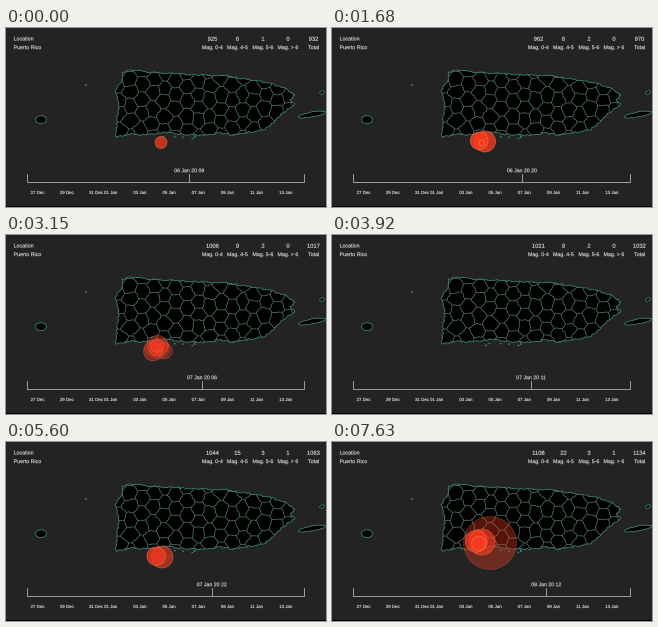
Write a matplotlib script that moves like this. It is 320 px wide and 179 px high and loops after 7.7 s.

```python
import numpy as np
import matplotlib.pyplot as plt
from matplotlib.animation import FuncAnimation
from matplotlib.collections import LineCollection
from matplotlib.patches import Circle, PathPatch, Polygon, Rectangle
from matplotlib.path import Path
from matplotlib.textpath import TextPath
from matplotlib.tri import Triangulation

W, H, DPI = 320, 179, 100
FRAMES, INTERVAL = 110, 70
BG, INK, AXIS = "#232323", "#dedede", "#b8b8b8"
COAST, BORDER = "#3c887c", "#55776e"
FILL, RIM = "#f83a1e", "#ff7a58"

plt.rcParams.update({"font.family": "Liberation Sans", "toolbar": "None"})
rng = np.random.default_rng(7)

# Corners of the main island, clockwise from the north-west
ISLAND = [(116, 44), (125, 42), (154, 45), (194, 47), (222, 48), (240, 51),
          (262, 55), (279, 60), (289, 67), (284, 72), (289, 76), (277, 85),
          (268, 94), (258, 102), (244, 104), (228, 107), (212, 105), (196, 107),
          (178, 107), (162, 104), (140, 107), (125, 106), (110, 109), (111, 97),
          (113, 76), (109, 63), (116, 52)]

# Small islands: x, y, half width, half height, tilt
ISLES = [(35, 91.7, 5.5, 4, 0), (306, 86.5, 14, 2.4, -0.18),
         (316, 64.5, 2.4, 1.6, -0.4), (80, 57, 0.7, 0.5, 0)]

# Quake swarms: first and last frame, count, x, y, radius
SWARMS = [(-2, 7, 1, 155, 114.5, 6.2), (18, 54, 8, 153, 113.5, 10.5),
          (58, 71, 4, 153, 113, 8), (73, 92, 3, 156, 115, 11),
          (80, 126, 1, 158, 101, 26.5), (94, 104, 1, 151, 99, 4.5),
          (100, 128, 5, 150, 100, 13)]

# Running totals at a few hours
HOURS = [0, 11, 21, 26, 37, 44, 51]
SMALL = [925, 962, 1006, 1021, 1044, 1077, 1108]
LIGHT = [6, 6, 9, 9, 15, 20, 22]


def px(n):
    return n * 72 / DPI


def rough(a, b, step, amp):
    """Points from a to b with a little sideways noise."""
    d = b - a
    size = np.hypot(*d) + 1e-9
    n = max(1, int(size / step))
    t = np.linspace(0, 1, n + 1)[:, None]
    noise = rng.uniform(-amp, amp, (n + 1, 1))
    noise[[0, -1]] = 0
    return a + t * d + noise * np.array([-d[1], d[0]]) / size


def rough_ring(pts, amp):
    pts = np.array(pts, float)
    return np.vstack([rough(a, b, 1.6, amp)[:-1]
                      for a, b in zip(pts, np.roll(pts, -1, axis=0))])


def oval(x, y, rx, ry, tilt):
    a = np.linspace(0, 2 * np.pi, 14, endpoint=False)
    u, v = rx * np.cos(a), ry * np.sin(a)
    c, s = np.cos(tilt), np.sin(tilt)
    return np.column_stack([x + u * c - v * s, y + u * s + v * c])


def circumcentre(t):
    a, b, c = t
    m = 2 * np.array([b - a, c - a])
    return np.linalg.solve(m, [b @ b - a @ a, c @ c - a @ a])


def districts():
    """Voronoi edges around a jittered grid of staggered columns."""
    pts = [(c * 11.3 + rng.uniform(-1.8, 1.8),
            r * 14.5 + 7 * (c % 2) + rng.uniform(-3.5, 3.5))
           for c in range(8, 29) for r in range(1, 10)]
    tri = Triangulation(*np.transpose(pts))
    mid = [circumcentre(np.array(pts)[t]) for t in tri.triangles]
    return [rough(mid[i], mid[j], 2.2, 0.7)
            for i, row in enumerate(tri.neighbors) for j in row if j > i]


def swarm(first, last, count, x, y, r):
    """Start, end, x, y and radius of each quake in a swarm."""
    for k in range(count):
        yield (first + 0.6 * (last - first) * k / count, last,
               x - 6 * np.sin(1.3 * k), y - 3 * np.sin(2.9 * k),
               r * (0.75 + 0.25 * np.cos(1.2 * k)))


fig = plt.figure(figsize=(W / DPI, H / DPI), dpi=DPI, facecolor=BG)
ax = fig.add_axes([0, 0, 1, 1])
ax.set(xlim=(0, W), ylim=(H, 0))
ax.axis("off")


class Label:
    """Text drawn as outlines, so that it can sit between pixels."""

    def __init__(self, x, y, s="", size=5.3, align=0.5):
        self.y, self.size, self.align = y, size, align
        self.patch = ax.add_patch(PathPatch(Path(np.zeros((1, 2))), fc=INK,
                                            ec=INK, lw=px(0.12), zorder=4))
        if s:
            self.write(x, s)

    def write(self, x, s):
        path = TextPath((0, 0), s, size=self.size)
        v = path.vertices
        box = path.get_extents()
        left = x - box.x0 - self.align * box.width
        self.patch.set_path(Path(v * [1, -1] + [left, self.y], path.codes))


def line(xs, ys):
    return ax.plot(xs, ys, color=AXIS, lw=px(0.8), zorder=3)[0]


def land(pts, amp):
    return ax.add_patch(Polygon(rough_ring(pts, amp), fc="black", ec=COAST,
                                lw=px(0.8), zorder=1))


# Map
main = land(ISLAND, 0.9)
borders = LineCollection(districts(), colors=BORDER, linewidths=px(0.75),
                         zorder=1.5)
ax.add_collection(borders)
borders.set_clip_path(main)
for isle in ISLES:
    land(oval(*isle), 0.4)
for x in rng.uniform(135, 215, 7):
    land(oval(x, rng.uniform(108, 111), 0.6, 0.3, 0), 0.1)

# Header
Label(8, 12.4, "Location", align=0)
Label(8, 21.1, "Puerto Rico", align=0)
COLS = [206.5, 231.5, 257, 282, 307.5]
for x, s in zip(COLS, ["Mag. 0-4", "Mag. 4-5", "Mag. 5-6", "Mag. > 6", "Total"]):
    Label(x, 21.1, s)
counters = [Label(x, 12.8, size=5.8) for x in COLS]

# Time axis
line([20.7, 20.7, 298.3, 298.3], [146, 153.7, 153.7, 146])
for day in sorted([*range(0, 5, 2), *range(5, 18, 2)]):
    s = f"{27 + day} Dec" if day < 5 else f"{day - 4:02d} Jan"
    Label(31.6 + 14.6 * day, 166, s, 4.4)
marker = line([0, 0], [146, 153.7])
clock = Label(0, 144.2, size=5.2)
ax.add_patch(Rectangle((0, 178), W, 1, fc="black", lw=0))

quakes = [q for s in SWARMS for q in swarm(*s)]
dots = [ax.add_patch(Circle((x, y), r, fc=FILL, ec=RIM, lw=px(0.6), zorder=2))
        for _, _, x, y, r in quakes]


def update(n):
    hour = int(0.468 * n + 0.02)
    x = 183.2 + 0.608 * hour
    marker.set_xdata([x, x])
    day, h = divmod(9 + hour, 24)
    clock.write(x, f"{6 + day:02d} Jan 20 {h:02d}")

    counts = [round(np.interp(hour, HOURS, row)) for row in (SMALL, LIGHT)]
    counts += [1 + (hour >= 6) + (hour >= 30), int(hour >= 32)]
    for label, cx, v in zip(counters, COLS, counts + [sum(counts)]):
        label.write(cx, str(v))

    for dot, (start, end, _, _, r) in zip(dots, quakes):
        age = n - start
        alive = 0 < age < end - start
        dot.set_visible(alive)
        if alive:
            dot.set_radius(r * (1 - max(0, 1 - age / 3) ** 3))
            dot.set_alpha(0.95 * (1 - age / (end - start)))
    return [marker, clock.patch, *(c.patch for c in counters), *dots]


anim = FuncAnimation(fig, update, frames=FRAMES, interval=INTERVAL,
                     init_func=lambda: update(0), repeat=True, repeat_delay=0)
plt.show()
```
